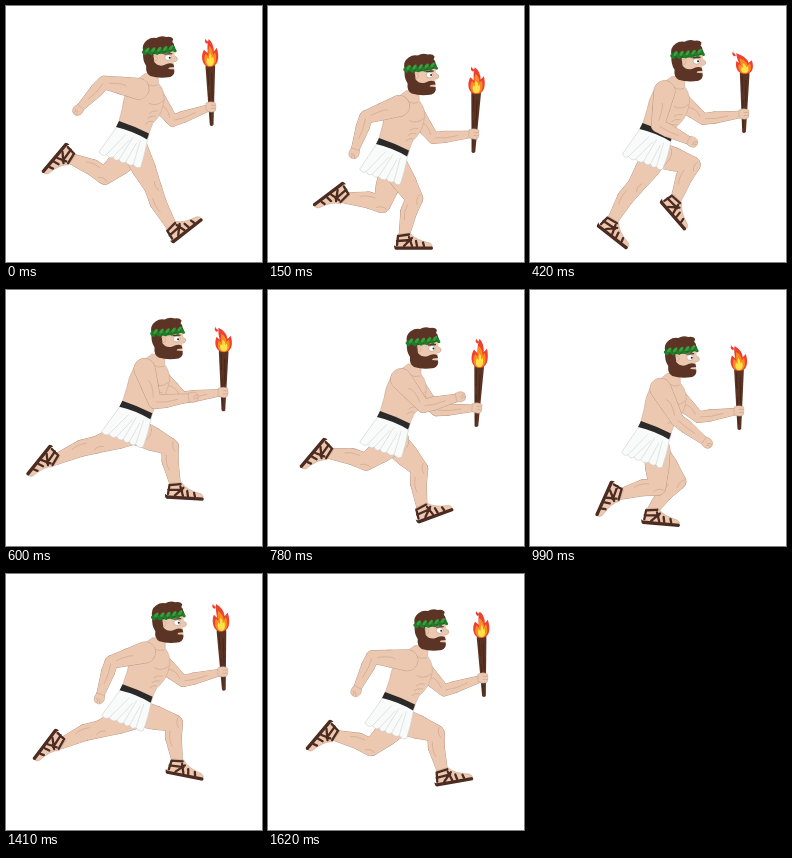
Animation, 256 px wide and 256 px high, one loop 1650 ms. Source, as an HTML page:

```html
<!DOCTYPE html>
<html lang="en">
<head>
<meta charset="utf-8">
<title>Torch runner</title>
<style>
  html, body { margin: 0; width: 100%; height: 100%; overflow: hidden; background: #fff; }
  svg { display: block; width: 100vw; height: 100vh; }
  .line { fill: none; stroke: #b99a86; stroke-width: 1; stroke-linejoin: round; }
  .skin { fill: #ecc8b0; }
  .edge { stroke: #c2a28e; stroke-width: .5; }
  .fold { fill: none; stroke: #c9a38c; stroke-width: .6; stroke-linecap: round; }
  .hair { fill: #5b3425; }
  .strap { fill: none; stroke: #4c2b20; stroke-width: 2.3; stroke-linecap: round; }
</style>
</head>
<body>
<svg viewBox="0 0 256 256" xmlns="http://www.w3.org/2000/svg">
  <defs>
    <g id="foot">
      <path class="skin edge" d="M1-2 L3-15 L15-16 Q20-9 35-6 Q39-3 36-1 Z"/>
      <path d="M-1-4 Q0-2 4-2.5 H37 Q39-1 37 .8 H1 Q-1 .5-1-4Z" fill="#4c2b20"/>
      <path class="strap" d="M2-4 L3-13 L14-14.500 M2-8 L16-9 M9-3 L17-11 M17-3 L14-12 M22-3 L21-8 M29-3 L28-6.500"/>
    </g>
  </defs>

  <g id="torch">
    <path d="M-1.500 18 Q0 20 2.200 18 L4.800-40 Q5-45 0-45 Q-5-45-4.800-40Z" fill="#5a3323"/>
    <path d="M-.5 14 L-1.500-14 M1.500-8 L1.200-34 M-2-22 L-2.500-38" fill="none" stroke="#43241a" stroke-width=".8"/>
    <path id="fireA" fill="#ee4130"/>
    <path id="fireB" fill="#f98b1f"/>
    <path id="fireC" fill="#fee24a"/>
    <path id="spark" fill="#ee4130"/>
  </g>

  <g id="farArm"></g>
  <g id="grip">
    <path class="skin edge" d="M-5-4 Q-1-6 4-4.500 Q5.500-3 4.500-1.500 Q5.500 0 4.500 1.500 Q5 4 3 4.800 Q-2 6-5 3Z"/>
    <path class="fold" d="M0-1.600 H4.500 M0 1.500 H4.500"/>
  </g>

  <g id="farLeg"></g>
  <use id="farFoot" href="#foot"/>
  <g id="nearLeg"></g>
  <use id="nearFoot" href="#foot"/>

  <g id="trunk">
    <path class="skin edge" d="M14-56 Q6-50-3-43 Q-9-32-10-22 Q-13-12-15-4 L15 8 Q16 2 20-6 Q29-14 31-24 Q35-36 27-46 L27-56Z"/>
    <path class="fold" d="M31-28 Q24-22 17-26 M25-18 Q20-19 17-16 M23-13 Q18-14 15-11 M20-8 Q16-9 13-6 M16-45 Q21-42 26-44"/>
  </g>

  <g id="skirt">
    <path id="cloth" fill="#f8fbf9" stroke="#c9cfcb" stroke-width=".6" stroke-linejoin="round"/>
    <path id="pleats" fill="none" stroke="#d3dad6" stroke-width=".7"/>
    <path d="M-14-9 Q1-4 16 3.500 L14 9.500 Q0 1-17-3Z" fill="#2c2929"/>
  </g>

  <g id="head">
    <path class="skin" d="M-7 0 H16 L16.500 6 Q20 7 19 10 Q18 12 15.500 11.500 L16 20 H-6Z"/>
    <path class="fold" d="M16.500 6 Q20 7 19 10 Q18 12 15.500 11.500"/>
    <path class="hair" d="M-15 2 Q-17-6-11-10 Q-7-13-2-12 Q3-15 8-13 Q13-14 15-11 L14-8 Q16-7 16-3 L-5 3 L-4 12 Q0 17 6 15 Q11 12 15 14 L16 17 L11 17.500 L10 19 L16 19.500 Q17 25 12 27 Q1 29-8 26 Q-13 23-12 16 Q-16 10-15 2Z"/>
    <ellipse cx="10" cy="7.500" rx="3.400" ry="2.800" fill="#fff" stroke="#8f7565" stroke-width=".4"/>
    <circle cx="11.500" cy="7.600" r="1" fill="#222"/>
    <path d="M6 4 L14 3.500" stroke="#5b3425" stroke-width="1.300"/>
    <path class="fold" d="M-5 6 Q-1 5-1 9 Q-2 12-4 11"/>
    <g id="wreath"></g>
  </g>

  <g id="nearArm"></g>
  <g id="fist">
    <path class="skin edge" d="M-4-4.500 Q2-6.500 5-3 Q7 1 4 4 Q0 6-4 4Z"/>
    <path class="fold" d="M5-2 Q2-2 1 0 M5 1 Q2 0 1 2"/>
  </g>
</svg>

<script>
const LOOP = 1650, STEP = 30;

// time, root x y, lean, near hand x y, torch hand x y, torch tilt,
// near heel x y, near foot angle, far heel x y, far foot angle
const POSES = [
  [0,    127, 124, -2,    72, 104,   205, 101, -1,   167, 237, -38,   60, 137, 130],
  [150,  125, 141, -1,    86, 147,   206, 128, 3,    127, 243, 0,     75, 176, 143],
  [420,  126.5, 126, 1.5, 162, 136,  214, 108, 1,    67, 220, 38,     130, 196, 49],
  [540,  131, 118, 2,     182, 112,  219, 99, 0,     44, 165, 118,    158, 200, 15],
  [780,  126, 130, 0,     192, 107,  209, 118, 3,    56, 148, 130,    150, 233, -20],
  [990,  125, 140, -2,    177, 153,  209, 121, 0,    81, 191, 114,    112, 233, 5],
  [1200, 126, 125, 2,     117, 146,  214, 104, -2,   129, 200, 50,    62, 213, 48],
  [1340, 130, 118, 2,     97, 128,   217, 97, -2,    155, 196, 20,    48, 163, 118],
  [1620, 131, 127, 2,     88, 117,   215, 104, -2,   168, 212, -10,   62, 146, 130]
];

const $ = id => document.getElementById(id);
const rad = a => a * Math.PI / 180;
const mix = (a, b, k) => [a[0] + (b[0] - a[0]) * k, a[1] + (b[1] - a[1]) * k];
const f = n => n.toFixed(2);
const put = (id, p, a = 0) =>
  $(id).setAttribute('transform', `translate(${f(p[0])} ${f(p[1])}) rotate(${f(a)})`);
const draw = (id, d) => $(id).setAttribute('d', d);

// offset (x, y) turned by a degrees and added to o
function at(o, x, y, a) {
  const c = Math.cos(rad(a)), s = Math.sin(rad(a));
  return [o[0] + x * c - y * s, o[1] + x * s + y * c];
}

// smooth curve through all poses
function poseAt(t) {
  const n = POSES.length;
  let i = 0;
  while (i < n - 2 && t >= POSES[i + 1][0]) i++;
  const a = POSES[i], b = POSES[i + 1], h = b[0] - a[0], u = (t - a[0]) / h;
  const slope = (j, k) => {
    const p = POSES[Math.max(j - 1, 0)], q = POSES[Math.min(j + 1, n - 1)];
    return (q[k] - p[k]) / (q[0] - p[0]);
  };
  const u2 = u * u, u3 = u2 * u;
  return a.map((v, k) =>
    (2 * u3 - 3 * u2 + 1) * v + (u3 - 2 * u2 + u) * h * slope(i, k) +
    (3 * u2 - 2 * u3) * b[k] + (u3 - u2) * h * slope(i + 1, k));
}

// middle joint of a two-bone limb; stretches when the goal is too far
function joint(a, b, l1, l2, side) {
  const dx = b[0] - a[0], dy = b[1] - a[1], d = Math.hypot(dx, dy);
  const k = Math.max(1, d / (l1 + l2));
  l1 *= k; l2 *= k;
  const along = (l1 * l1 - l2 * l2 + d * d) / (2 * d);
  const out = side * Math.sqrt(Math.max(0, l1 * l1 - along * along));
  return [a[0] + (dx * along - dy * out) / d, a[1] + (dy * along + dx * out) / d];
}

// chain of tapered capsules, each node = [point, radius]
function chain(nodes) {
  let d = '';
  for (let i = 1; i < nodes.length; i++) {
    const [a, r] = nodes[i - 1], [b, s] = nodes[i];
    const len = Math.hypot(b[0] - a[0], b[1] - a[1]) || 1;
    const nx = (b[1] - a[1]) / len, ny = (a[0] - b[0]) / len;
    const pt = (p, q) => f(p[0] + nx * q) + ' ' + f(p[1] + ny * q);
    d += `M${pt(a, r)}L${pt(b, s)}A${s} ${s} 0 0 1 ${pt(b, -s)}L${pt(a, -r)}A${r} ${r} 0 0 1 ${pt(a, r)}Z`;
  }
  return d;
}

const limbs = {};
for (const id of ['farArm', 'nearArm', 'farLeg', 'nearLeg']) {
  $(id).innerHTML = '<path class="line"/><path class="skin"/><path class="fold"/>';
  limbs[id] = $(id).children;
}
function limb(id, nodes, fold) {
  const d = chain(nodes);
  limbs[id][0].setAttribute('d', d);
  limbs[id][1].setAttribute('d', d);
  limbs[id][2].setAttribute('d', fold);
}
const curve = (a, b, c) => `M${a.map(f)}Q${b.map(f)} ${c.map(f)}`;

function leg(side, hip, heel, angle) {
  const ankle = at(heel, 9, -13, angle);
  const knee = joint(hip, ankle, 37, 39, -1);
  const turn = Math.atan2(ankle[1] - knee[1], ankle[0] - knee[0]) * 180 / Math.PI;
  const calf = at(mix(knee, ankle, .36), 0, 2, turn);
  limb(side + 'Leg', [
    [hip, 13], [mix(hip, knee, .5), 11.5], [knee, 8.3], [calf, 8], [ankle, 5]
  ], curve(at(knee, -5, -4, turn), at(knee, 0, -1, turn), at(knee, 5, -4, turn)) +
     curve(at(calf, -6, 3, turn), at(calf, 3, 5, turn), at(calf, 9, 2, turn)));
  put(side + 'Foot', heel, angle);
}

function arm(id, top, hand, l1, l2, r) {
  const elbow = joint(top, hand, l1, l2, 1);
  const up = mix(top, elbow, .5), low = mix(elbow, hand, .28);
  limb(id, [
    [top, r], [up, r * .8], [elbow, r * .6], [low, r * .62], [mix(elbow, hand, .9), r * .36], [hand, r * .36]
  ], curve(mix(top, elbow, .35), at(up, 3, -3, 0), mix(top, elbow, .85)) +
     curve(mix(elbow, hand, .05), at(low, 1, 2, 0), mix(elbow, hand, .6)));
  return Math.atan2(hand[1] - elbow[1], hand[0] - elbow[0]) * 180 / Math.PI;
}

// flame tongue with its tip bent sideways
function tongue(w, h, tip, y) {
  return `M0 ${y}C${-w * 1.1} ${y} ${-w * 1.3} ${f(y - h * .4)} ${f(-w * .75 + tip * .3)} ${f(y - h * .62)}` +
    `Q${f(-w * .35 + tip * .3)} ${f(y - h * .52)} ${f(-w * .25 + tip * .4)} ${f(y - h * .5)}` +
    `Q${f(-w * .3 + tip * .7)} ${f(y - h * .8)} ${f(tip)} ${f(y - h)}` +
    `Q${f(w * .55 + tip * .3)} ${f(y - h * .85)} ${f(w * .5)} ${f(y - h * .55)}` +
    `L${f(w * .9)} ${f(y - h * .68)}C${w * 1.3} ${f(y - h * .3)} ${w} ${y} 0 ${y}Z`;
}

function fire(t) {
  const bend = -5 - 4 * Math.cos(2 * Math.PI * (t - 420) / 780);
  const tall = 25 - 3.5 * Math.cos(2 * Math.PI * (t - 420) / 720) + Math.sin(t / 37);
  draw('fireA', tongue(7.6, tall, bend, -40));
  draw('fireB', tongue(5.6, tall * .74, bend * .6 + Math.sin(t / 45), -40.5));
  draw('fireC', tongue(3.4, tall * .48, bend * .3 + Math.sin(t / 31) * .8, -41));
  const x = bend - 2, y = -41 - tall * .8;
  draw('spark', `M${f(x)} ${f(y)}q-3-2-1-5q0 2 2 2.500q1.500 2-1 2.500Z`);
}

function cloth(t) {
  const wave = i => Math.sin(t / 130 + i * 1.3) * .8;
  let hem = '', folds = '';
  for (let i = 0; i <= 6; i++) {
    const k = i / 6, x = -34 + 41 * k + wave(i), y = 22 + 15 * k;
    hem += i ? `Q${f(x - 4)} ${f(y + 2.5)} ${f(x)} ${f(y)}` : `L${f(x)} ${f(y)}`;
    if (i && i < 6) folds += `M${f(x)} ${f(y)}L${f(-11 + 22 * k + (x + 34 - 41 * k) * .1)} ${f(7 + 9 * k - (i % 2) * 4)}`;
  }
  draw('cloth', `M-15-5${hem}Q12 24 15 7Z`);
  draw('pleats', folds);
}

let leaves = '<path d="M-15 1 Q0 4 17-2" fill="none" stroke="#1d6b25" stroke-width="4.500"/>';
for (let i = 0; i < 11; i++) {
  const x = -14 + i * 3, y = 1.5 - i * i * .03 + (i % 2 ? -1.6 : 1.4);
  leaves += `<ellipse cx="${x}" cy="${f(y)}" rx="2.9" ry="1.6" fill="${i % 2 ? '#36a03a' : '#237c2b'}" transform="rotate(${i % 2 ? -50 : 42} ${x} ${f(y)})"/>`;
}
$('wreath').innerHTML = leaves;

function render(t) {
  const [, x, y, lean, hx, hy, tx, ty, tilt, nx, ny, na, fx, fy, fa] = poseAt(t);
  const root = [x, y], hand = [hx, hy], grip = [tx, ty];
  put('trunk', root, lean);
  put('skirt', root);
  put('head', at(root, 28, -79, lean));
  leg('near', [x + 2, y + 20], [nx, ny], na);
  leg('far', [x, y + 22], [fx, fy], fa);
  put('fist', hand, arm('nearArm', at(root, 7, -41, lean), hand, 35, 38, 10.5));
  put('torch', grip, tilt);
  put('grip', grip, tilt);
  arm('farArm', at(root, 24, -31, lean), grip, 28, 41, 9);
  fire(t);
  cloth(t);
}

function tick() {
  render(Math.floor(performance.now() % LOOP / STEP) * STEP);
  requestAnimationFrame(tick);
}
tick();
</script>
</body>
</html>
```
